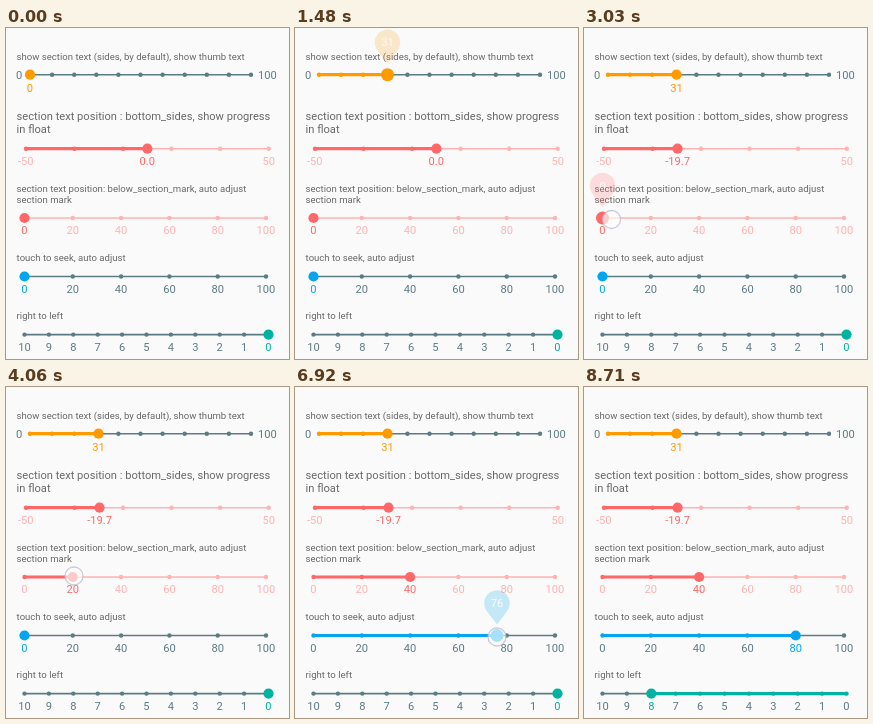
These frames come from a looping animation (283x331 px, 9500 ms). An HTML page:

```html
<!DOCTYPE html>
<html lang="en">
<head>
<meta charset="utf-8">
<title>Seek bars</title>
<style>
  html, body { margin: 0; width: 100%; height: 100%; overflow: hidden; background: #fafafa; }
  svg { display: block; width: 100vw; height: 100vh; }
  text { font: 11.13px Roboto, sans-serif; }
  .title { fill: #686868; }
  .small { font-size: 9.57px; }
  .mid { text-anchor: middle; }
</style>
</head>
<body>
<svg id="stage" viewBox="0 0 283 331">
  <text class="title small" x="10.6" y="32">show section text (sides, by default), show thumb text</text>
  <text class="title" x="10.6" y="92">section text position : bottom_sides, show progress</text>
  <text class="title" x="10.6" y="105">in float</text>
  <text class="title small" x="10.6" y="164">section text position: below_section_mark, auto adjust</text>
  <text class="title small" x="10.6" y="175">section mark</text>
  <text class="title small" x="10.6" y="233">touch to seek, auto adjust</text>
  <text class="title small" x="10.6" y="291">right to left</text>
</svg>
<script>
const LOOP = 9500, LAG = 18, PRESS = 90;
const GRAY = '#5c7c84', PALE = '#ffb3b3', RED = '#ff6868';
const stage = document.getElementById('stage');

function add(tag, attrs, parent = stage, text) {
  const el = document.createElementNS('http://www.w3.org/2000/svg', tag);
  set(el, attrs);
  if (text !== undefined) el.textContent = text;
  return parent.appendChild(el);
}
function set(el, attrs) {
  for (const k in attrs) el.setAttribute(k, attrs[k]);
}
const clamp = v => Math.min(1, Math.max(0, v));
const mix = (a, b, k) => a + (b - a) * k;
const ease = k => 0.5 - 0.5 * Math.cos(Math.PI * clamp(k));
const span = (t, from, to) => to > from ? (t - from) / (to - from) : +(t >= from);

// a: x of the minimum, b: x of the maximum
const bars = [
  { a: 24, b: 245, y: 46.7, min: 0, max: 100, parts: 10, color: '#ff9a00', rest: GRAY, start: 0,
    ends: [[13.2, 51.3], [261.5, 51.3]], textY: 64 },
  { a: 20, b: 262.7, y: 120.7, min: -50, max: 50, parts: 5, color: RED, rest: PALE, start: 0, digits: 1,
    ends: [[19.7, 137], [262.7, 137]], textY: 137, r: 15.7 },
  { a: 18.5, b: 260, y: 190, min: 0, max: 100, parts: 5, color: RED, rest: PALE, start: 0, textY: 206 },
  { a: 18.5, b: 260, y: 248.5, min: 0, max: 100, parts: 5, color: '#03a5f0', rest: GRAY, start: 0, textY: 264.5 },
  { a: 262.5, b: 18.5, y: 306.6, min: 0, max: 10, parts: 10, color: '#00b3a1', rest: GRAY, start: 0, textY: 323.3 }
];

// move: travel time, touch: finger x, dy: finger below the track, drag: thumb x, snap: final value
const gestures = [
  { bar: 0, down: 430, move: [550, 1250], up: 1330, hide: 1380, end: 1580, touch: [27, 98], dy: 1.5, drag: 92.5, snap: 31 },
  { bar: 1, down: 1820, move: [1930, 2330], up: 2400, hide: 2410, end: 2560, touch: [143.5, 92], dy: 1.5, drag: 93.54, snap: -19.7 },
  { bar: 2, down: 2910, move: [3020, 3430], up: 3500, hide: 3500, end: 3710, touch: [27.5, 63], dy: 1.5, drag: 57, snap: 20 },
  { bar: 2, down: 4060, move: [4150, 4440], up: 4510, hide: 4510, end: 4710, touch: [68, 108], dy: -1, drag: 107, snap: 40 },
  { bar: 3, down: 5190, move: [5240, 5240], up: 5440, hide: 5440, end: 5690, touch: [88, 88], dy: 1.5, drag: 87, snap: 20 },
  { bar: 3, down: 6000, move: [6050, 6050], up: 6220, hide: 6220, end: 6440, touch: [174, 174], dy: 1.5, drag: 174, snap: 60 },
  { bar: 3, down: 6800, move: [6840, 6840], up: 6990, hide: 6990, end: 7190, touch: [202, 202], dy: 1.5, drag: 202, snap: 80 },
  { bar: 4, down: 7560, move: [7640, 8280], up: 8530, hide: 8540, end: 8700, touch: [260, 67], dy: 8, drag: 73, snap: 8 }
];

const toX = (bar, v) => mix(bar.a, bar.b, (v - bar.min) / (bar.max - bar.min));
const format = (bar, x) => {
  const v = mix(bar.min, bar.max, (x - bar.a) / (bar.b - bar.a));
  return bar.digits ? v.toFixed(bar.digits) : String(Math.round(v));
};

function build(bar) {
  const line = (color, width) => add('line', {
    x1: bar.a, x2: bar.b, y1: bar.y, y2: bar.y, stroke: color, 'stroke-width': width, 'stroke-linecap': 'round'
  });
  const label = (x, y, text, fill) => add('text', { class: 'mid', x, y, fill }, stage, text);
  line(bar.rest, 1.6);
  bar.fill = line(bar.color, 3.2);
  bar.marks = [];
  for (let i = 0; i <= bar.parts; i++) {
    const x = mix(bar.a, bar.b, i / bar.parts);
    const dot = add('circle', { cx: x, cy: bar.y, r: 2.2 });
    const text = bar.ends ? null : label(x, bar.textY, format(bar, x), bar.rest);
    bar.marks.push({ x, dot, text });
  }
  if (bar.ends) {
    bar.ends.forEach(([x, y], i) => label(x, y, i ? bar.max : bar.min, bar.rest));
    bar.value = label(0, bar.textY, '', bar.color);
  }
  bar.thumb = add('circle', { cy: bar.y, fill: bar.color });
}

function bubblePath(r) {
  const w = Math.sqrt(3) / 2 * r, y = 1.5 * r, tip = r * 8 / 3;
  return `M0 ${tip}Q${-w - 1.6} ${y - 1.6} ${-w} ${y}A${r} ${r} 0 1 1 ${w} ${y}Q${w + 1.6} ${y - 1.6} 0 ${tip}Z`;
}

bars.forEach(build);
const bubble = add('g', {});
const balloon = add('path', {}, bubble);
const bubbleText = add('text', { class: 'mid', fill: '#fff' }, bubble);
const finger = add('circle', { r: 9, fill: '#fff', 'fill-opacity': 0.65, stroke: '#b4bccd', 'stroke-opacity': 0.75, 'stroke-width': 1.3 });

const travel = (g, t) => ease(span(t, g.move[0], g.move[1]));

function drawBar(bar, x, held) {
  const dir = Math.sign(bar.b - bar.a);
  set(bar.fill, { x2: x, visibility: Math.abs(x - bar.a) < 0.5 ? 'hidden' : 'visible' });
  set(bar.thumb, { cx: x, r: held ? 6.5 : 5.1 });
  for (const m of bar.marks) {
    set(m.dot, { fill: (x - m.x) * dir >= -0.1 ? bar.color : bar.rest });
    if (m.text) set(m.text, { fill: Math.abs(x - m.x) < 1 ? bar.color : bar.rest });
  }
  if (bar.value) {
    set(bar.value, { x, visibility: held ? 'hidden' : 'visible' });
    bar.value.textContent = format(bar, x);
  }
}

function drawBubble(g, bar, t, from) {
  const alpha = clamp(span(t, g.down + PRESS, g.down + PRESS + 150)) * (1 - clamp(span(t, g.hide, g.hide + 125)));
  const r = bar.r || 12.8;
  const x = mix(from, g.drag, travel(g, t - LAG));
  set(bubble, { opacity: alpha, transform: `translate(${x} ${bar.y - 11 - r * 8 / 3})` });
  set(balloon, { d: bubblePath(r), fill: bar.color });
  set(bubbleText, { y: r + 4 });
  bubbleText.textContent = format(bar, mix(from, g.drag, travel(g, t)));
}

function render(t) {
  const state = bars.map(bar => ({ x: toX(bar, bar.start), held: false }));
  set(bubble, { opacity: 0 });
  set(finger, { visibility: 'hidden' });
  for (const g of gestures) {
    if (t < g.down) break;
    const bar = bars[g.bar], s = state[g.bar], from = s.x, goal = toX(bar, g.snap);
    if (t >= g.end) {
      s.x = goal;
      continue;
    }
    s.x = mix(mix(from, g.drag, travel(g, t - LAG)), goal, clamp(span(t, g.up, g.end - 20)));
    s.held = t >= g.down + PRESS;
    drawBubble(g, bar, t, from);
    if (t < g.up) {
      set(finger, {
        visibility: 'visible',
        cx: mix(g.touch[0], g.touch[1], travel(g, t)),
        cy: bar.y + g.dy
      });
    }
  }
  bars.forEach((bar, i) => drawBar(bar, state[i].x, state[i].held));
}

const origin = performance.now();
function tick() {
  render((performance.now() - origin) % LOOP);
  requestAnimationFrame(tick);
}
tick();
</script>
</body>
</html>
```
